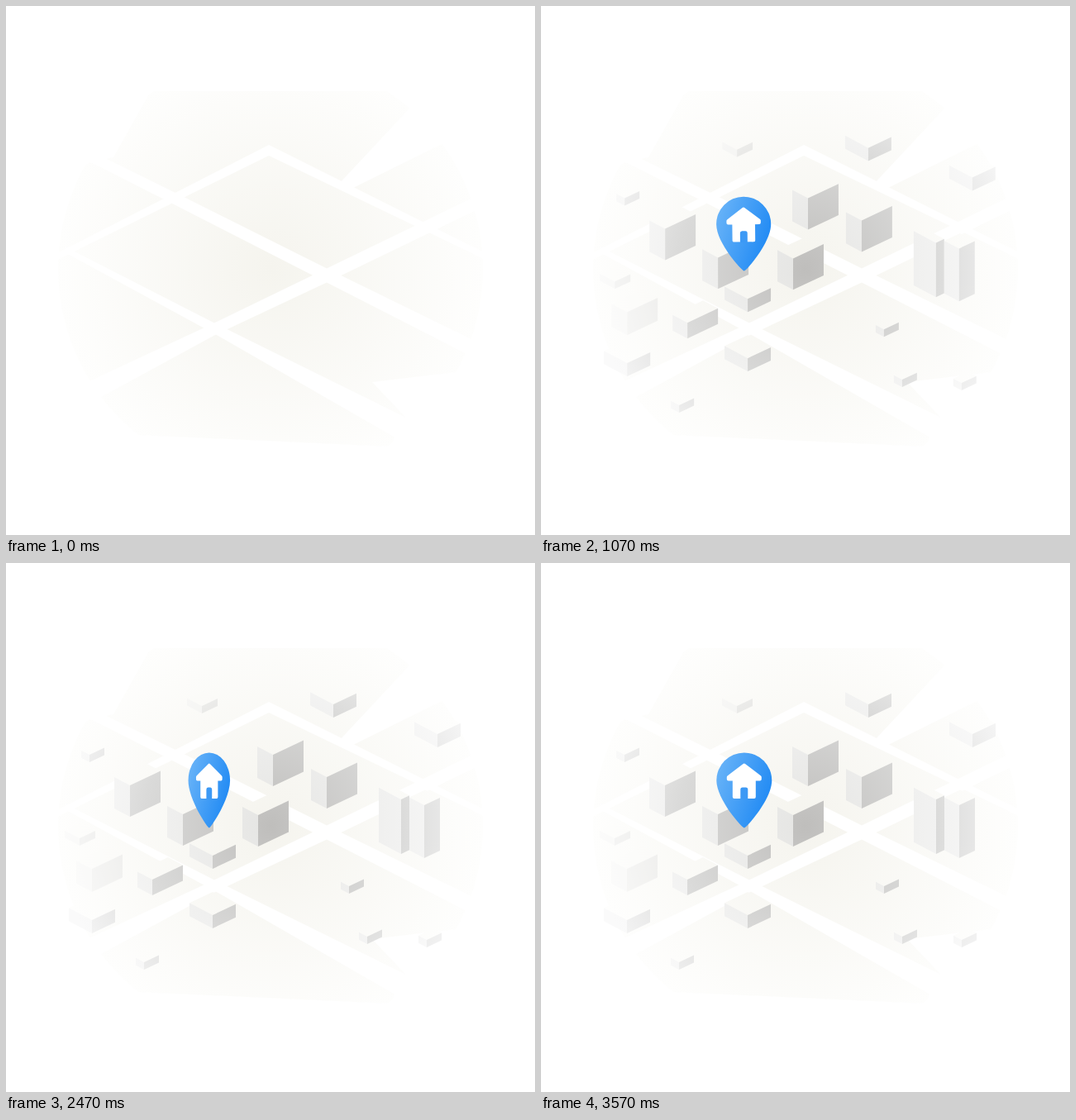
Write an HTML page that moves like this. It is 640 px wide and 640 px high and loops after 3610 ms.

```html
<!DOCTYPE html>
<html lang="en">
<head>
<meta charset="utf-8">
<title>Home on a map</title>
<style>
  html, body { margin: 0; width: 100%; height: 100%; overflow: hidden; background: #fff; }
  svg { display: block; width: 100vw; height: 100vh; }
</style>
</head>
<body>
<svg viewBox="0 0 640 640">
  <defs>
    <radialGradient id="land" gradientUnits="userSpaceOnUse" cx="320" cy="318" r="258">
      <stop stop-color="#f5f4ee"/>
      <stop offset="1" stop-color="#fefefd"/>
    </radialGradient>
    <radialGradient id="left" gradientUnits="userSpaceOnUse" cx="320" cy="318" r="258">
      <stop stop-color="#e5e5e3"/>
      <stop offset="1" stop-color="#fafafa"/>
    </radialGradient>
    <radialGradient id="right" gradientUnits="userSpaceOnUse" cx="320" cy="318" r="258">
      <stop stop-color="#bfbebc"/>
      <stop offset=".6" stop-color="#dadad9"/>
      <stop offset="1" stop-color="#f4f4f4"/>
    </radialGradient>
    <linearGradient id="blue" gradientUnits="userSpaceOnUse" x1="-33" y1="-72" x2="33" y2="-50">
      <stop stop-color="#68b3f8"/>
      <stop offset="1" stop-color="#248cf4"/>
    </linearGradient>
  </defs>

  <circle cx="320" cy="318" r="257" fill="url(#land)"/>
  <g fill="#fff">
    <path d="M60 60H580V103H175L130 183L100 190L60 215Z"/>
    <path d="M443 455L545 443L580 420V580H60V515L115 517L465 533L483 497Z"/>
    <path d="M403 215L490 122V100H580L535 163L418 221Z"/>
    <g id="roads"></g>
  </g>

  <g id="town"></g>

  <!-- the tip of the pin is its origin -->
  <g id="pin">
    <path fill="url(#blue)" d="M0 0C-2.5 0-33.5-34.5-33.5-57.5a33.5 33.5 0 0 1 67 0C33.5-34.5 2.5 0 0 0Z"/>
    <path fill="#fff" stroke="#fff" stroke-width="4" stroke-linejoin="round"
      d="M0-76L19-61.5V-59H12V-37.5H-12V-59H-19V-61.5Z"/>
    <path fill="#3c99f5" d="M-4.5-35v-11.5q0-2.5 2.5-2.5h4q2.5 0 2.5 2.5V-35Z"/>
  </g>
</svg>
<script>
const $ = id => document.getElementById(id);
const town = $('town'), pin = $('pin');

// a road runs through points [x, y, thickness measured upright]
function road(...points) {
  const upper = points.map(([x, y, w]) => [x, y - w / 2]);
  const lower = points.map(([x, y, w]) => [x, y + w / 2]).reverse();
  return `<polygon points="${[...upper, ...lower].join(' ')}"/>`;
}

$('roads').innerHTML =
  road([80, 171, 13], [210, 236, 15], [388, 326, 17], [580, 422, 21]) +
  road([60, 488, 30], [252, 391, 15], [388, 326, 17], [580, 233, 17]) +
  road([60, 304, 8], [318, 174.5, 13], [580, 303, 8]) +
  road([72, 295, 7], [253, 390.5, 13], [490, 517, 32]);

// blocks of equal size share a kind: left width, right width, height
const kinds = [
  { size: [19, 37, 38], at: [[323, 270], [388, 297], [150, 307], [214, 342], [305, 343]] },
  { size: [28, 28, 16], at: [[396, 187], [522, 223], [250, 370], [250, 442], [104, 448]] },
  { size: [10, 18, 9], at: [[101, 241], [415, 400], [437, 461], [509, 465], [167, 492]] },
  { size: [18, 19, 9], at: [[237, 182], [89, 342]], opacity: .5 },
  { size: [19, 37, 28], at: [[104, 398]], opacity: .4 },
  { size: [18, 37, 19], at: [[177, 402]] },
  { size: [27, 10, 66], at: [[478, 352]] },
  { size: [18, 19, 64], at: [[506, 357]] }
];

const face = (fill, d) => `<path fill="url(#${fill})" d="${d}"/>`;

function block(x, y, [l, r, h], opacity = 1) {
  const top = y - h, leftRise = l * .53, rightRise = r * .47;
  return `<g opacity="${opacity}">` +
    face('land', `M${x} ${top}l${-l} ${-leftRise}l${r} ${-rightRise}l${l} ${leftRise}Z`) +
    face('left', `M${x} ${y}v${-h}l${-l} ${-leftRise}v${h}Z`) +
    face('right', `M${x} ${y}v${-h}l${r} ${-rightRise}v${h}Z`) + '</g>';
}

// far blocks first, so that near ones cover them
town.innerHTML = kinds
  .flatMap(({ size, at, opacity }) => at.map(([x, y]) => ({ x, y, size, opacity })))
  .sort((a, b) => a.y - b.y)
  .map(b => block(b.x, b.y, b.size, b.opacity))
  .join('');

const LOOP = 3610, STEP = 40, SPIN_START = 29, SPIN_END = 88;

// share of the way still to go, falling exponentially after the start
const remaining = (time, start) => time <= start ? 1 : Math.exp((start - time) / 155);

function draw(now) {
  const tick = Math.floor((now % LOOP - 25) / STEP);
  const time = tick * STEP;

  const rise = remaining(time, 160);
  town.setAttribute('opacity', Math.min(1, (1 - rise) * 1.1));
  town.setAttribute('transform',
    `translate(312 490) scale(${1 - .3 * rise} ${1 - .6 * rise}) translate(-312 -490)`);

  const drop = remaining(time, 370);
  const size = 1 - drop;
  const spinning = tick >= SPIN_START && tick < SPIN_END;
  const turn = spinning ? Math.abs(Math.cos((tick - 47.1) * Math.PI / 18)) : 1;
  pin.setAttribute('visibility', size > 0 ? 'visible' : 'hidden');
  pin.setAttribute('transform',
    `translate(245.8 320.5) rotate(${-48 * drop}) scale(${size * turn} ${size})`);
}

const start = performance.now();
function loop() {
  draw(performance.now() - start);
  requestAnimationFrame(loop);
}
loop();
</script>
</body>
</html>
```
